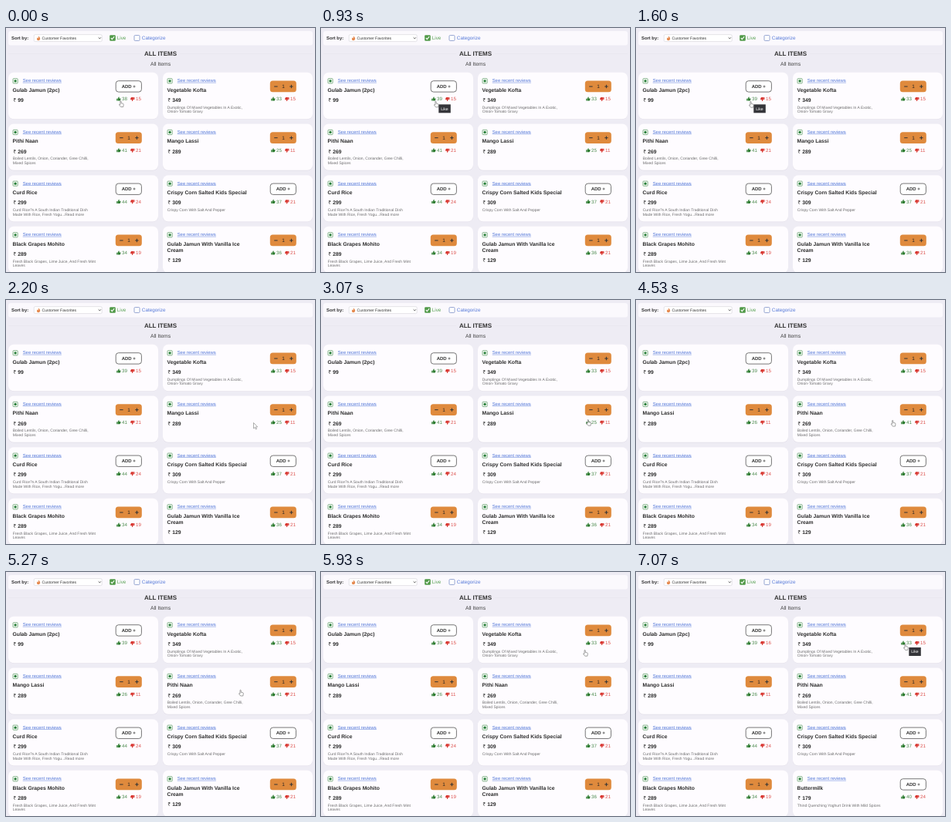
Write an HTML page that moves like this. It is 400 by 317 pixels and loops after 8 s.

```html
<!DOCTYPE html>
<html lang="en">
<head>
<meta charset="utf-8">
<title>Menu with live ratings</title>
<style>
  html, body { margin: 0; width: 100%; height: 100%; overflow: hidden; background: #eeecf4; }
  svg { display: block; width: 400px; height: 317px; }
  text { font-family: "Liberation Sans", Arial, sans-serif; text-rendering: geometricPrecision; white-space: pre; }
  .b { font-weight: bold; }
  .m { text-anchor: middle; }
</style>
</head>
<body>
<svg viewBox="0 0 400 317">
  <defs>
    <g id="veg">
      <rect x=".5" y=".5" width="6.2" height="6.2" rx=".8" fill="#f4faf4" stroke="#6fa577" stroke-width=".8"/>
      <circle cx="3.6" cy="3.6" r="1.6" fill="#237c35"/>
    </g>
    <path id="thumb" d="M0 2.3h1.2v2.9H0zM1.5 2.4 2.6.2q.9-.3.9.7l-.3 1.1h1.7q.6.2.4.9l-.6 1.9q-.2.4-.7.4H1.5z"/>
    <path id="hand" d="M1.7.7q.8-.6 1.2.2v2.5l2.3.5q.9.3.8 1.2L5.5 8.2H2.4L.4 5.6q-.2-.9.5-.8l.8.5z"
      fill="#fff" stroke="#666" stroke-width=".6" stroke-linejoin="round"/>
    <path id="arrow" d="M0 0v7.4l1.7-1.5 1.2 2.6 1.1-.5-1.1-2.6h2.2z"
      fill="#fff" stroke="#777" stroke-width=".6" stroke-linejoin="round"/>
  </defs>
  <rect width="400" height="317" fill="#eeecf4"/>
  <rect x="3" y="4" width="394" height="18.5" rx="3" fill="#fbf9fd"/>
  <text class="b" x="7" y="15.3" font-size="5.85" fill="#333">Sort by:</text>
  <rect x="36.2" y="8.6" width="88" height="9" rx="1.5" fill="#fff" stroke="#d5d3da" stroke-width=".6"/>
  <path d="M42 10.2q2.7 2.6 2.1 4.4-.5 1.7-2 1.7-2.4-.2-2.2-2.4.2-1 1-1.6.1.8.6.9.8-1 .5-3z" fill="#e58a50"/>
  <text x="46.6" y="15" font-size="5.1" fill="#333">Customer Favorites</text>
  <path d="m119.7 12.3 1.6 1.6 1.6-1.6" fill="none" stroke="#333" stroke-width=".8"/>
  <rect x="134.2" y="9.2" width="7.6" height="7.6" rx="1.2" fill="#529a49"/>
  <path d="m135.9 13 1.5 1.6 2.8-3.6" fill="none" stroke="#fff" stroke-width="1.1"/>
  <text x="143.7" y="15.4" font-size="6.4" fill="#5ba355">Live</text>
  <rect x="166" y="9.5" width="7" height="7" rx="1.2" fill="#fff" stroke="#7f92c8" stroke-width=".8"/>
  <text x="175.8" y="15.4" font-size="6.35" fill="#5478d8">Categorize</text>
  <path d="M3 33.5H175M225 33.5H397" stroke="#e6e4ec" stroke-width=".6"/>
  <text class="b m" x="200" y="36.2" font-size="8" fill="#333">ALL ITEMS</text>
  <text class="m" x="200" y="48.8" font-size="6.8" fill="#444">All Items</text>
  <g id="cards"></g>
  <use id="trail" href="#hand" x="145" y="138" opacity=".55"/>
  <g id="tip">
    <rect width="15.5" height="11" fill="#35353a"/>
    <text class="m" x="7.7" y="7.4" font-size="5.2" fill="#fff">Like</text>
  </g>
  <use id="cursor"/>
</svg>
<script>
const LOOP = 8000, LIKE1 = 270, LIKE2 = 3130, SWAP = 3530, RESORT = 6400;
const $ = id => document.getElementById(id);

const item = (title, price, desc, inCart, up, down) =>
  ({ title: title.split('|'), price, desc: desc.split('|'), inCart, up, down });
const gulab = item('Gulab Jamun (2pc)', 99, '', 0, 38, 15);
const kofta = item('Vegetable Kofta', 349, 'Dumplings Of Mixed Vegetables In A Exotic,|Onion-Tomato Gravy', 1, 33, 15);
const naan = item('Pithi Naan', 269, 'Boiled Lentils, Onion, Coriander, Gree Chilli,|Mixed Spices', 1, 41, 21);
const lassi = item('Mango Lassi', 289, '', 1, 25, 11);
const curd = item('Curd Rice', 299, 'Curd Rice?s A South Indian Traditional Dish|Made With Rice, Fresh Yogu...Read more', 0, 44, 24);
const corn = item('Crispy Corn Salted Kids Special', 309, 'Crispy Corn With Salt And Pepper', 0, 37, 21);
const mohito = item('Black Grapes Mohito', 289, 'Fresh Black Grapes, Lime Juice, And Fresh Mint|Leaves', 1, 34, 19);
const iceCream = item('Gulab Jamun With Vanilla Ice|Cream', 129, '', 1, 36, 21);
const buttermilk = item('Buttermilk', 179, 'Thind Quenching Yoghurt Drink With Mild Spices', 0, 40, 24);

const text = (x, y, size, fill, str, cls = '') =>
  `<text class="${cls}" x="${x}" y="${y}" font-size="${size}" fill="${fill}">${str}</text>`;

function button(inCart) {
  return inCart
    ? `<rect x="138.8" y="10.8" width="34" height="14.7" rx="3.5" fill="#df8a3d"/>
       <path d="M144.2 18.2h4.4M164.2 18.2h4.4M166.4 16v4.4" stroke="#333" stroke-width="1"/>`
      + text(156, 20.5, 6.4, '#222', 1, 'm')
    : '<rect x="139.2" y="10.9" width="33.2" height="14.4" rx="3.5" fill="#fff" stroke="#555" stroke-width=".8"/>'
      + text(155.8, 20.3, 6, '#333', 'ADD +', 'b m');
}

function card(it, i) {
  const shift = (it.title.length - 1) * 8;
  return `<g transform="translate(${3 + i % 2 * 200} ${57.8 + (i >> 1) * 66.67})">
    <rect y=".6" width="194" height="60.4" rx="7" fill="#e2dfe9"/>
    <rect width="194" height="60.4" rx="7" fill="#fefcff"/>
    <use href="#veg" x="5.5" y="7.4"/>
    ${text(18.7, 12.5, 5.9, '#5478d8', 'See recent reviews')}
    <path d="M18.7 13.3h50.2" stroke="#5478d8" stroke-width=".5"/>
    ${it.title.map((s, n) => text(5.5, 24.8 + n * 8.6, 6.78, '#2c2c2c', s, 'b')).join('')}
    ${text(6.2, 38.2 + shift, 7, '#333', '₹')}${text(12.3, 38.2 + shift, 6.8, '#2c2c2c', it.price, 'b')}
    ${it.desc.map((s, n) => text(5.7, 46.8 + n * 5.9, 5, '#6c6c6c', s)).join('')}
    ${button(it.inCart)}
    <use href="#thumb" x="140.2" y="31.6" fill="#2f7d32"/>${text(147, 36.6, 6.2, '#4a8a4c', it.up)}
    <use href="#thumb" transform="translate(163.4 37.4) rotate(180)" fill="#d8352f"/>${text(165, 36.6, 6.2, '#dc514c', it.down)}
  </g>`;
}

function menu(t) {
  const first = { ...gulab, up: t < LIKE1 ? 38 : 39, down: t < RESORT ? 15 : 16 };
  const liked = { ...lassi, up: t < LIKE2 ? 25 : 26 };
  const second = t < SWAP ? [naan, liked] : [liked, naan];
  return [first, kofta, ...second, curd, corn, mohito, t < RESORT ? iceCream : buttermilk];
}

// Pointer moves: start, end, x, y
const moves = [
  [530, 1330, 146.2, 95],
  [1600, 2200, 320.5, 159.5],
  [2270, 3000, 343.5, 155],
  [3330, 3700, 349.3, 158],
  [4270, 4870, 301.3, 152.8],
  [5270, 5930, 339.3, 101],
  [6070, 6870, 346.2, 93.2]
];
function pointer(t) {
  let x = 146.2, y = 94.3;
  for (const [start, end, toX, toY] of moves) {
    const p = Math.min(1, Math.max(0, (t - start) / (end - start)));
    const e = p * p * (3 - 2 * p);
    x += (toX - x) * e;
    y += (toY - y) * e;
  }
  return [x, y];
}

const show = (el, on) => el.setAttribute('visibility', on ? 'visible' : 'hidden');
let shown = '';

function draw(now) {
  const t = now % LOOP;
  const html = menu(t).map(card).join('');
  if (html !== shown) $('cards').innerHTML = shown = html;

  const [x, y] = pointer(t);
  $('cursor').setAttribute('href', t > 1700 && t < 2850 ? '#arrow' : '#hand');
  $('cursor').setAttribute('transform', `translate(${x} ${y})`);
  show($('trail'), t >= 3700 && t < 4130);
  show($('tip'), t >= 530 && t < 1670 || t >= 7070);
  $('tip').setAttribute('transform', t < 4000 ? 'translate(152.3 99.3)' : 'translate(353.3 98)');
  requestAnimationFrame(draw);
}
requestAnimationFrame(draw);
</script>
</body>
</html>
```
